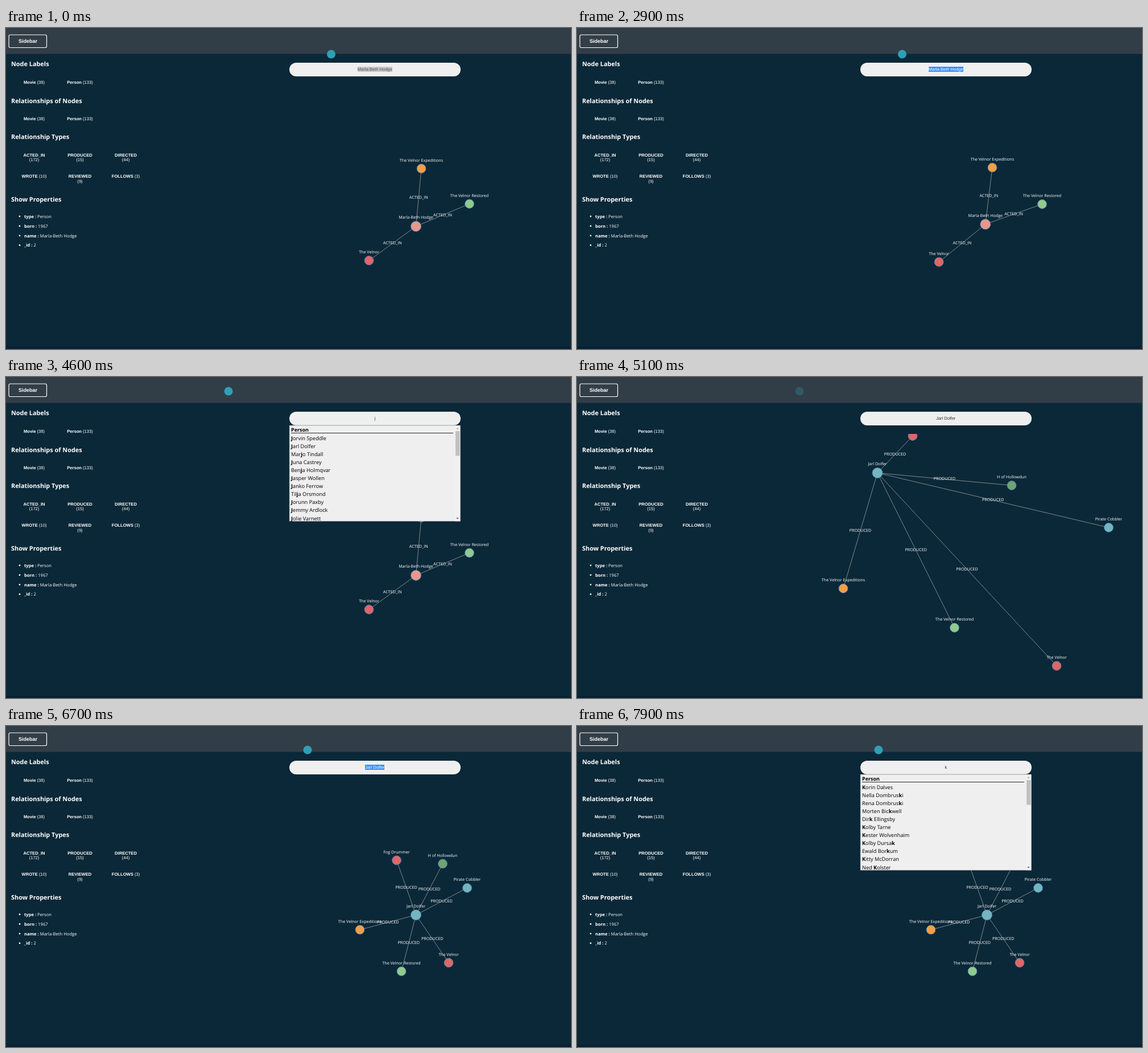
These frames come from a looping animation (993x564 px, 8000 ms). An HTML page:

```html
<!DOCTYPE html>
<html lang="en">
<head>
<meta charset="utf-8">
<title>Graph explorer</title>
<style>
html, body { margin: 0; width: 100%; height: 100%; overflow: hidden; background: #0b2838; }
svg { position: absolute; left: 0; top: 0; text-rendering: geometricPrecision; }
.ui { font-family: "Open Sans", "Noto Sans", sans-serif; }
.btn { font-family: "Liberation Sans", Arial, sans-serif; }
#search {
  position: absolute; left: 497.5px; top: 61px; width: 301.5px; height: 23.5px; border-radius: 12px;
  background: #efefef; font: 7.5px/9px "Liberation Sans", Arial, sans-serif;
  display: flex; align-items: center; justify-content: center; text-rendering: geometricPrecision;
}
</style>
</head>
<body>
<svg id="page" width="993" height="564" viewBox="0 0 993 564"></svg>
<div id="search"><span id="query"></span></div>
<svg width="993" height="564" viewBox="0 0 993 564">
  <clipPath id="view"><rect y="100" width="993" height="464"/></clipPath>
  <g id="graph" clip-path="url(#view)"></g>
  <g id="list"></g>
  <circle id="ball" r="7.5" fill="#2f9fb5"/>
</svg>
<script>
const LOOP = 8000, STEP = 100;
const $ = id => document.getElementById(id);
const bold = s => `<tspan font-weight="700">${s}</tspan>`;
const lerp = (a, b, k) => a + (b - a) * k;
const clamp = k => Math.max(0, Math.min(1, k));

// y is the middle of the capital letters
function text(x, y, size, s, { cls = 'ui', anchor = 'start', fill = '#fff', weight = 400 } = {}) {
  return `<text class="${cls}" x="${x}" y="${y + size * .357}" font-size="${size}" ` +
    `text-anchor="${anchor}" fill="${fill}" font-weight="${weight}">${s}</text>`;
}

const person = 'Marla-Beth Hodge', producer = 'Jarl Dolfer';

function drawPage() {
  const button = (col, y, name, count, wrap) => {
    const x = [49.5, 130, 210.5][col], opt = { cls: 'btn', anchor: 'middle' };
    return wrap
      ? text(x, y, 7.6, bold(name), opt) + text(x, y + 8.6, 7.6, `(${count})`, opt)
      : text(x, y, 7.6, `${bold(name)} (${count})`, opt);
  };
  const heads = [['Node Labels', 63], ['Relationships of Nodes', 128],
    ['Relationship Types', 191.5], ['Show Properties', 301.5]];
  const props = [['type', 'Person'], ['born', 1967], ['name', person], ['_id', 2]];
  $('page').innerHTML =
    '<rect width="993" height="45.5" fill="#323e47"/>' +
    '<rect y="560.5" width="993" height="4" fill="#08202f"/>' +
    '<rect x="5" y="12" width="66.5" height="22.5" rx="2.5" fill="none" stroke="#fff" stroke-width="1.2"/>' +
    text(38.5, 23, 9, 'Sidebar', { cls: 'btn', anchor: 'middle', weight: 700 }) +
    heads.map(([s, y]) => text(9, y, 10.9, s, { weight: 700 })).join('') +
    [95, 159.5].map(y => button(0, y, 'Movie', 38) + button(1, y, 'Person', 133)).join('') +
    button(0, 223, 'ACTED_IN', 172, true) + button(1, 223, 'PRODUCED', 15, true) +
    button(2, 223, 'DIRECTED', 44, true) + button(0, 260.5, 'WROTE', 10) +
    button(1, 260.5, 'REVIEWED', 9, true) + button(2, 260.5, 'FOLLOWS', 3) +
    props.map(([key, value], i) => {
      const y = 331 + i * 16.9;
      return `<circle cx="24" cy="${y}" r="1.4" fill="#fff"/>` + text(32, y, 7.63, `${bold(key + ' :')} ${value}`);
    }).join('');
}

const RED = '#e06666', ORANGE = '#f49f45', GREEN = '#90ca8c', TEAL = '#75b6be';

// node: label, fill, scattered x and y, settled x and y; the first one is the hub
const cast = {
  edge: 'ACTED_IN', start: 2200, time: 800, power: 2,
  nodes: [
    [person, '#e6998b', 546.5, 109.5, 720.5, 348.5],
    ['The Velnor Expeditions', ORANGE, 725.5, 133, 730, 247],
    ['The Velnor Restored', GREEN, 1005, 342.5, 814.5, 309],
    ['The Velnor', RED, 518, 576.5, 638, 408.5]
  ]
};
const crew = {
  edge: 'PRODUCED', start: 5100, time: 900, power: 1,
  nodes: [
    [producer, TEAL, 528, 168.5, 720.5, 332],
    ['Fog Drummer', RED, 590, 103.5, 686.5, 236],
    ['H of Hollowdun', '#6fa372', 764, 190.5, 767.5, 242],
    ['Pirate Cobbler', TEAL, 934.5, 264.5, 810.5, 284.5],
    ['The Velnor Expeditions', ORANGE, 468, 371.5, 622, 358],
    ['The Velnor', RED, 843, 507.5, 778, 416],
    ['The Velnor Restored', GREEN, 663.5, 440.5, 695, 431]
  ]
};

function drawGraph(scene, t) {
  const left = t < scene.start ? 0 : (1 - clamp((t - scene.start) / scene.time)) ** scene.power;
  const opt = { anchor: 'middle' };
  const nodes = scene.nodes.map(([label, fill, x0, y0, x1, y1], i) =>
    ({ label, fill, x: lerp(x1, x0, left), y: lerp(y1, y0, left), r: i ? 7.9 : 9 }));
  const [hub, ...others] = nodes;
  $('graph').innerHTML =
    others.map(n => `<path d="M${hub.x} ${hub.y}L${n.x} ${n.y}" stroke="#a5a9aa" stroke-width=".75"/>`).join('') +
    nodes.map(n => `<circle cx="${n.x}" cy="${n.y}" r="${n.r}" fill="${n.fill}" stroke="#4f86c6" stroke-width=".8"/>`).join('') +
    others.map(n => text((hub.x + n.x) / 2, (hub.y + n.y) / 2 - .7, 7.2, scene.edge, opt)).join('') +
    nodes.map(n => text(n.x, n.y - (n === hub ? 15.7 : 14.8), 7.15, n.label, opt)).join('');
}

const matches = {
  j: ['Jorvin Speddle', producer, 'Marjo Tindall', 'Juna Castrey', 'Benja Holmqvar', 'Jasper Wollen',
    'Janko Ferrow', 'Tilja Orsmond', 'Jorunn Paxby', 'Jemmy Ardlock', 'Jolie Varnett'],
  k: ['Korin Dalves', 'Nella Dombruski', 'Rena Dombruski', 'Morten Bickwell', 'Dirk Ellingsby', 'Kolby Tarne',
    'Kester Wolvenhaim', 'Kolby Dursak', 'Ewald Borkum', 'Kitty McDorran', 'Ned Kolster']
};

function drawList(key) {
  if (!matches[key]) {
    $('list').innerHTML = '';
    return;
  }
  const opt = { fill: '#000' }, hit = new RegExp(key, 'gi');
  $('list').innerHTML =
    '<rect x="498" y="85" width="300.6" height="168.6" fill="#efefef" stroke="#5f6d76" stroke-width=".6"/>' +
    text(501, 92.5, 9, 'Person', { fill: '#000', weight: 700 }) +
    '<path d="M501 98.5H786" stroke="#111" stroke-width=".9"/>' +
    matches[key].map((s, i) => text(501, 107.3 + i * 14.1, 9.2, s.replace(hit, bold), opt)).join('') +
    '<rect x="789" y="85.5" width="9.3" height="167.8" fill="#f1f1f1"/>' +
    '<rect x="790" y="95" width="7.5" height="43.5" fill="#c1c1c1"/>' +
    '<path d="M791.5 91.5h4l-2-2.2z" fill="#999"/><path d="M791.5 247.5h4l-2 2.2z" fill="#444"/>';
}

// from time, text, text colour, selection colour
const entries = [
  [0, person, '#555', '#c6c6c6'],
  [2200, person, '#fff', '#3390ff'],
  [4200, 'j', '#333', 'none'],
  [5100, producer, '#333', 'none'],
  [6400, producer, '#fff', '#3390ff'],
  [7300, 'k', '#333', 'none']
];

function drawSearch(t) {
  const [from, value, color, back] = entries.findLast(e => t >= e[0]);
  const caret = value.length === 1 && t - from < 400;
  $('query').textContent = value;
  $('query').style.cssText = `color:${color};background:${back};box-shadow:${caret ? '.7px 0 #333' : 'none'}`;
  drawList(value);
}

function drawBall(t) {
  const k = clamp((t - 3000) / 700), ease = k * k * (3 - 2 * k), back = t >= 6300;
  const x = back ? 530 : lerp(571.5, 391, ease), y = back ? 42 : lerp(46, 25, ease);
  const alpha = t < 5100 || back ? 1 : t < 5200 ? .28 : 0;
  $('ball').setAttribute('transform', `translate(${x} ${y})`);
  $('ball').setAttribute('opacity', alpha);
}

const begin = performance.now();
let last = -1;

function frame() {
  const t = Math.floor((performance.now() - begin) % LOOP / STEP) * STEP;
  if (t !== last) {
    last = t;
    drawGraph(t < crew.start ? cast : crew, t);
    drawSearch(t);
    drawBall(t);
  }
  requestAnimationFrame(frame);
}

drawPage();
frame();
</script>
</body>
</html>
```
